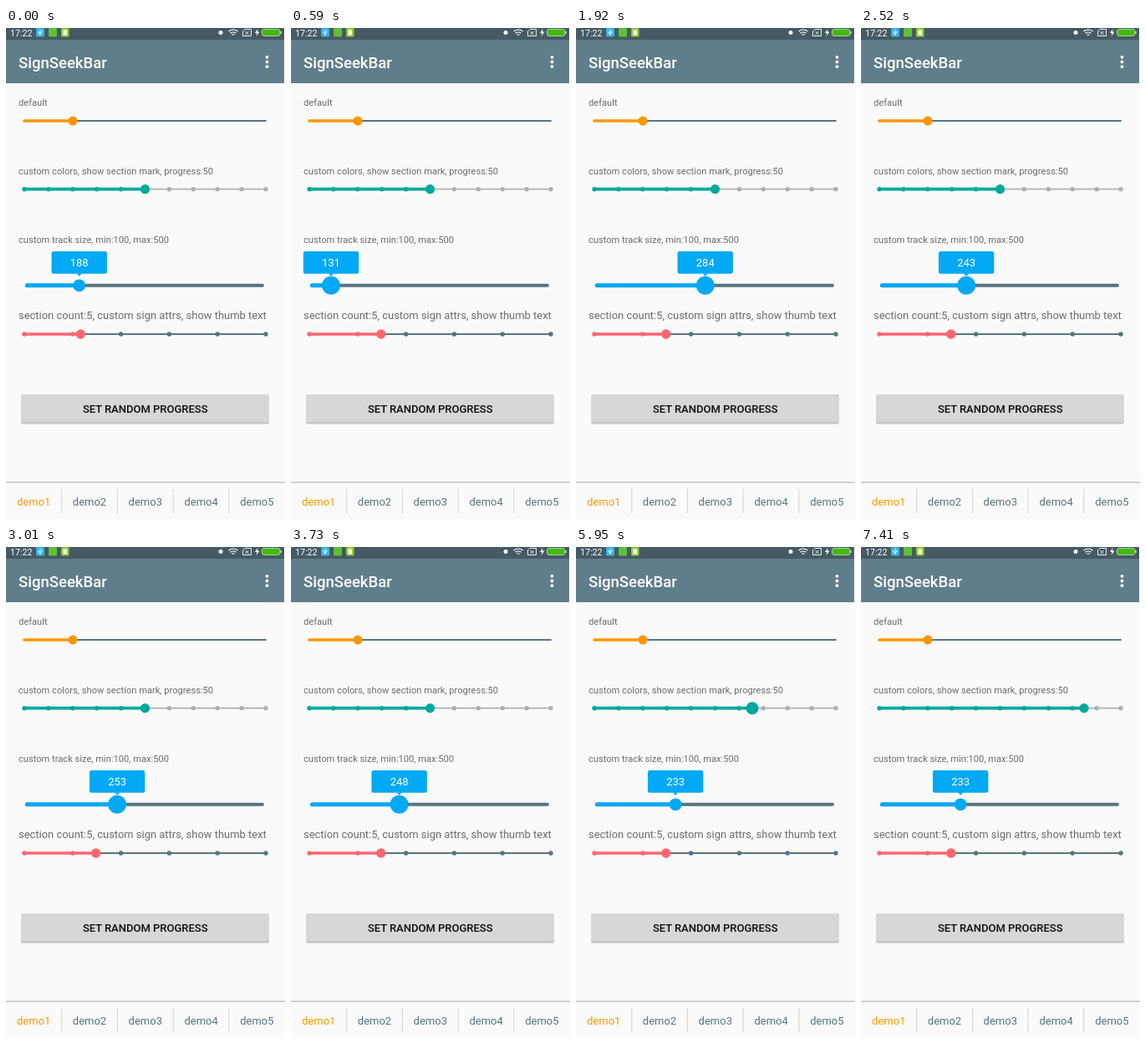
An HTML page that plays this animation: 334x587 px, repeating every 8 s.

```html
<!DOCTYPE html>
<html lang="en">
<head>
<meta charset="utf-8">
<title>SignSeekBar</title>
<style>
html, body { margin: 0; height: 100%; overflow: hidden; background: #fafafa; }
svg { display: block; width: 100vw; height: 100vh; font-family: Roboto, sans-serif; }
.label { font-size: 11.13px; fill: #6b6b6b; }
.big { font-size: 12.94px; }
.mid { text-anchor: middle; font-size: 13px; }
</style>
</head>
<body>
<svg viewBox="0 0 334 587">
  <rect width="334" height="587" fill="#fafafa"/>

  <rect width="333" height="66" fill="#607d8b"/>
  <rect width="333" height="14" fill="#455a64"/>
  <text x="5" y="9.5" font-size="10.6" fill="#fff">17:22</text>
  <rect x="36" y="0" width="10" height="10.5" rx="1.5" fill="#33b5e5"/>
  <path d="M41 2v7M39 4v2l2 1.5M43 3.5v2l-2 1.5" fill="none" stroke="#fff" stroke-width=".9"/>
  <rect x="51" y="0" width="10" height="10.5" rx="1.5" fill="#5fc038"/>
  <rect x="66" y="0" width="9.5" height="10.5" rx="1.5" fill="#8fce2c"/>
  <rect x="68.5" y="2.5" width="4.5" height="6" fill="#fff"/>
  <circle cx="257" cy="5.5" r="2.5" fill="#fff"/>
  <g fill="none" stroke="#fff">
    <path d="M266.5 4q5.5-4 11 0M268.5 6.3q3.5-2.6 7 0M270.5 8.3q1.5-1 3 0" stroke-width="1.2"/>
    <path d="M286 1.5h7.5v8h-10v-5.5zM286.5 4l4 4m0-4l-4 4" stroke-width=".9"/>
    <rect x="306.5" y="1.5" width="21.5" height="8" rx="2.5" fill="#43b80f" stroke="#c4e6b8" stroke-width=".8"/>
    <path d="M329 4v3" stroke-width="1"/>
  </g>
  <path d="M301.5 1l-3.5 5h2.5l-1 4 4-5.5h-2.6z" fill="#fff"/>
  <text x="15" y="47.5" font-size="18.55" font-weight="500" fill="#fff">SignSeekBar</text>
  <g fill="#fff">
    <circle cx="312.5" cy="34.8" r="1.9"/>
    <circle cx="312.5" cy="40.5" r="1.9"/>
    <circle cx="312.5" cy="46.2" r="1.9"/>
  </g>

  <g class="label">
    <text x="15" y="93">default</text>
    <text x="15" y="175">custom colors, show section mark, progress:50</text>
    <text x="15" y="257">custom track size, min:100, max:500</text>
    <text x="15" y="347.5" class="big">section count:5, custom sign attrs, show thumb text</text>
  </g>

  <g id="bars"></g>

  <rect x="18" y="439" width="297" height="34.5" rx="2" fill="#c6c6c6"/>
  <rect x="18" y="438" width="297" height="33" rx="2" fill="#d6d7d7"/>
  <text class="mid" x="166.7" y="459.8" font-weight="500" fill="#0c0c0c">SET RANDOM PROGRESS</text>

  <rect y="542.5" width="334" height="1.5" fill="#c4c4c4"/>
  <g id="tabs"></g>
</svg>
<script>
const SLATE = '#587480', LOOP = 8000;
const bars = document.getElementById('bars');

document.getElementById('tabs').innerHTML = [1, 2, 3, 4, 5].map(n =>
  `<text class="mid" x="${66.8 * n - 33.6}" y="571" fill="${n === 1 ? '#ff9800' : SLATE}">demo${n}</text>` +
  (n < 5 ? `<path d="M${66.7 * n} 551v29" stroke="#d0d0d0"/>` : '')).join('');

// drag paths as [tick, value]: blue in progress units, teal in pixels
const blueDrag = { start: 223, tick: 120.5, keys: [
  [-1, 188], [0, 188], [3, 131], [6, 178], [7, 190], [13, 271], [14, 284], [15, 295],
  [16, 294], [20, 226], [21, 217], [23, 253], [25, 288], [26, 296], [27, 292],
  [29, 248], [30, 236], [31, 232], [33, 232], [34, 233]] };
const tealDrag = { start: 5583, tick: 121, keys: [
  [0, 166.5], [3, 211], [5, 231], [6, 236.5], [7, 243], [8, 246.5], [9, 246.5], [12, 267]] };

const tickAt = (drag, t) => Math.floor((t - drag.start) / drag.tick);

function valueAt(keys, k) {
  const i = keys.findIndex(key => key[0] > k);
  if (i === 0) return keys[0][1];
  if (i < 0) return keys[keys.length - 1][1];
  const [k0, v0] = keys[i - 1], [k1, v1] = keys[i];
  return v0 + (v1 - v0) * (k - k0) / (k1 - k0);
}

const line = (x0, x1, y, color, width) =>
  `<path d="M${x0} ${y}H${x1}" stroke="${color}" stroke-width="${width}" stroke-linecap="round"/>`;
const dot = (x, y, r, color) => `<circle cx="${x}" cy="${y}" r="${r}" fill="${color}"/>`;

function bar({ y, x, r, color, rest = SLATE, from = 22, to = 311, sections = 0, thin = 1.9, thick = 3.7 }) {
  let out = line(from, to, y, rest, thin) + line(from, x, y, color, thick);
  for (let i = 0; sections && i <= sections; i++) {
    const mx = from + (to - from) * i / sections;
    out += dot(mx, y, 2.75, mx <= x ? color : rest);
  }
  return out + dot(x, y, r, color);
}

function sign(x, value, color) {
  return `<rect x="${x - 33.2}" y="267" width="66.4" height="26.8" rx="2.5" fill="${color}"/>
    <path d="M${x - 3.2} 293.5h6.4l-3.2 3.3z" fill="${color}"/>
    <text class="mid" x="${x}" y="285.3" fill="#fff">${Math.round(value)}</text>`;
}

function draw(t) {
  const bk = tickAt(blueDrag, t), tk = tickAt(tealDrag, t);
  const value = valueAt(blueDrag.keys, bk);
  const blueX = 26.3 + 0.698 * (value - 100);
  const blue = '#03a9f4';
  bars.innerHTML =
    bar({ y: 111, x: 80, r: 5.5, color: '#fb9600' }) +
    bar({ y: 192.7, x: valueAt(tealDrag.keys, tk), r: tk >= 0 && tk < 15 ? 7.5 : 5.6,
      color: '#00a99d', rest: '#b0b0b0', sections: 10, thin: 1.7 }) +
    bar({ y: 307.8, x: blueX, r: bk >= 0 && bk < 35 ? 11 : 7.4,
      color: blue, from: 25.2, to: 307, thin: 3.9, thick: 5 }) +
    sign(blueX, value, blue) +
    bar({ y: 366, x: bk < 0 ? 89.3 : 107.7, r: 5.7, color: '#ff6670', sections: 5 });
}

let begin;
function frame(now) {
  begin ??= now;
  draw((now - begin) % LOOP);
  requestAnimationFrame(frame);
}
draw(0);
requestAnimationFrame(frame);
</script>
</body>
</html>
```
